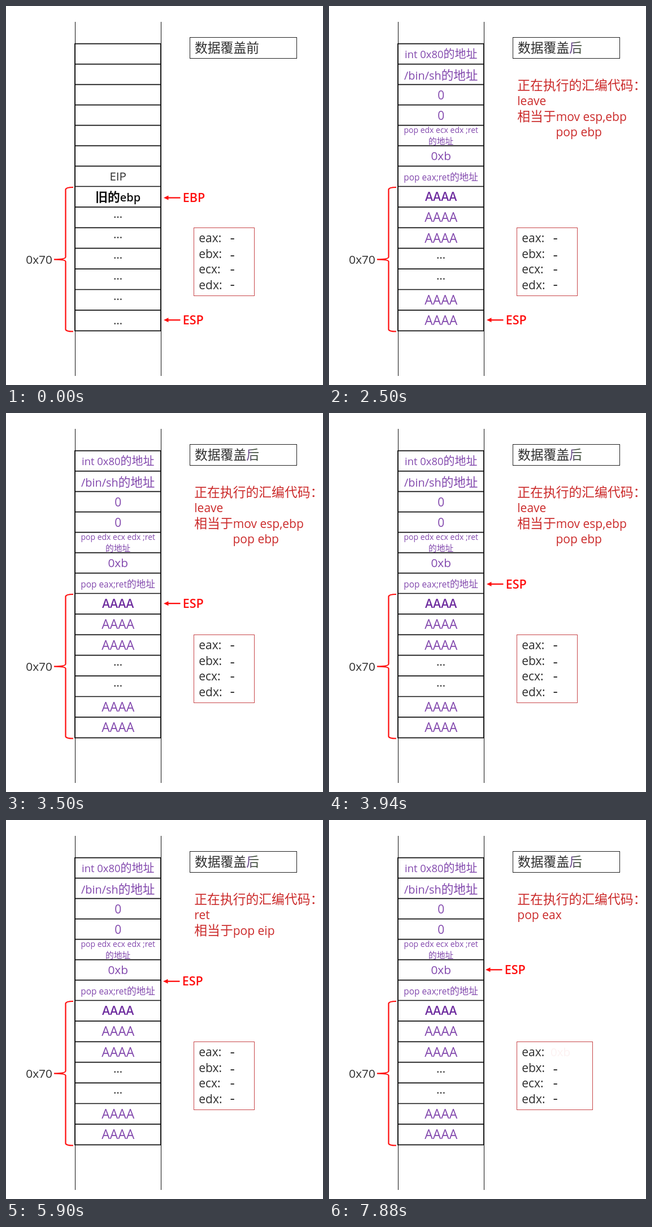
Recreate the animation shown at these times as an HTML page. Size 561 by 669 pixels, loop 8 s.

```html
<!DOCTYPE html>
<html lang="zh-CN">
<head>
<meta charset="utf-8">
<title>Stack overwrite</title>
<style>
  html, body { margin: 0; width: 100%; height: 100%; overflow: hidden; background: #fff; }
  svg { display: block; width: 561px; height: 669px; }
  text { font-family: "Open Sans", "Noto Sans CJK SC", "Noto Sans CJK", sans-serif; white-space: pre; }
</style>
</head>
<body>
<svg id="stage" viewBox="0 0 561 669" xmlns="http://www.w3.org/2000/svg">
  <defs>
    <linearGradient id="mixed">
      <stop offset=".2" stop-color="#6b4a8c"/>
      <stop offset=".5" stop-color="#3c4a38"/>
    </linearGradient>
  </defs>
</svg>
<script>
const LOOP = 8000;
const LINE = '#111', INK = '#2e2e2e', PURPLE = '#8248ad', DEEP_PURPLE = '#7030a0';
const RED = '#ff0d0d', CODE = '#cb2a2a', BOX = '#c8474a';
const MID = 198.2;
const CJK_SCALE = 1.086;
const stage = document.getElementById('stage');

function add(parent, tag, attrs = {}) {
  const node = document.createElementNS(stage.namespaceURI, tag);
  for (const key in attrs) node.setAttribute(key, attrs[key]);
  parent.appendChild(node);
  return node;
}

// Chinese runs are set slightly larger than the Latin runs beside them.
function label(parent, content, x, y, size = 21, attrs = {}) {
  const node = add(parent, 'text', { x, y, 'font-size': size, fill: INK, ...attrs });
  for (const run of content.match(/[\u4e00-\u9fff：]+|[^\u4e00-\u9fff：]+/g)) {
    const isCjk = /[\u4e00-\u9fff]/.test(run);
    add(node, 'tspan', isCjk ? { 'font-size': size * CJK_SCALE } : {}).textContent = run;
  }
  return node;
}

const group = () => add(stage, 'g');
const path = (parent, d, stroke, width) =>
  add(parent, 'path', { d, stroke, 'stroke-width': width, fill: 'none' });
const box = (parent, x, y, width, height, stroke) =>
  add(parent, 'rect', { x, y, width, height, stroke, fill: 'none' });
const cell = (parent, content, y, size, fill = PURPLE, weight = 400) =>
  label(parent, content, MID, y, size, { fill, 'font-weight': weight, 'text-anchor': 'middle' });
const dots = (parent, row) => cell(parent, '…', 373.5 + 36.4 * (row - 8), 20.6, INK);

function pointer(name) {
  const g = group();
  add(g, 'path', { d: 'M0 0L8.5-4V4Z', fill: RED });
  path(g, 'M7 0H29.5', RED, 2.3);
  label(g, name, 33.8, 7.6, 21.5, { fill: RED, 'font-weight': 600 });
  return g;
}

const place = (node, x, y) => node.setAttribute('transform', `translate(${x} ${y})`);

// Stack outline
const frame = group();
path(frame, 'M122.5 28V653M274.5 28V653', LINE, 1);
for (let i = 0; i <= 14; i++) {
  const y = i < 7 ? 66.7 + 36 * i : 318.5 + 36.4 * (i - 7);
  path(frame, `M121.5 ${y}H275`, LINE, 1.7);
}
path(frame, 'M122 66V574M274 66V574', LINE, 1.9);
path(frame, 'M119 320Q106 320 105.5 324V443Q105.5 447.3 85 447.3' +
  'Q105.5 447.3 105.5 451V571Q106 574.5 119 574.5', RED, 2.2);
label(frame, '0x70', 35.3, 455, 20.8);

// Title
box(frame, 325.5, 55.5, 189, 37, '#222');
label(frame, '数据覆盖', 334, 82.3);

// Stack contents
const before = group();
label(before, '前', 425.2, 82.3);
cell(before, 'EIP', 307.8, 20.6, INK);
cell(before, '旧的ebp', 344.8, 20, LINE, 600);
for (let row = 8; row < 13; row++) dots(before, row);
cell(before, '…', 562, 20.6, INK);

const after = group();
label(after, '后', 425.2, 82.3, 21, { fill: 'url(#mixed)' });
cell(after, 'int 0x80的地址', 92.3, 18.4);
cell(after, '/bin/sh的地址', 129.5, 19.9);
cell(after, '0', 165.3);
cell(after, '0', 201.3);
const popEdx = cell(after, 'pop edx ecx edx ;ret', 224.3, 14);
const popEbx = cell(after, 'pop edx ecx ebx ;ret', 224.3, 14);
cell(after, '的地址', 243.5, 13.6);
cell(after, '0xb', 271.8, 20.8);
cell(after, 'pop eax;ret的地址', 307.5, 15.4);
cell(after, 'AAAA', 344.3, 21.4, DEEP_PURPLE, 600);
for (const y of [381, 417.8, 527, 563]) cell(after, 'AAAA', y, 22.9);
dots(after, 10);
dots(after, 11);

// Registers
const narrowBox = box(stage, 332.5, 391.5, 107, 120, BOX);
const wideBox = box(stage, 332.5, 391.5, 134, 120, BOX);
const registers = group();
const dashes = ['eax:', 'ebx:', 'ecx:', 'edx:'].map((name, i) => {
  label(registers, name, 341.3, 417.3 + 27.5 * i);
  return label(registers, '-', 400.6, [418, 447.6, 473.3, 500.3][i], 26, { 'text-anchor': 'middle' });
});
const eaxValue = label(registers, '0xb', 392, 417.3, 20.6, { fill: '#fdf2f2' });

// Instruction notes, each shown for one stretch of time
function note(start, end, ...lines) {
  const g = group();
  ['正在执行的汇编代码：', ...lines].forEach((line, i) =>
    label(g, line.trimStart(), line.startsWith(' ') ? 401.5 : 333.3, 147.6 + 27.5 * i, 21, { fill: CODE }));
  return { g, start, end };
}
const notes = [
  note(2500, 4480, 'leave', '相当于mov esp,ebp', ' pop ebp'),
  note(4480, 7010, 'ret', '相当于pop eip'),
  note(7010, LOOP, 'pop eax'),
];

const ebp = pointer('EBP');
place(ebp, 279, 338.5);
const esp = pointer('ESP');

function stepped(t, start, interval, count, from, to) {
  const n = Math.max(0, Math.min(count, Math.floor((t - start) / interval)));
  return from + (to - from) * n / count;
}

function espHeight(t) {
  if (t < 3400) return stepped(t, 2510, 110, 7, 554.3, 343);
  if (t < 4480) return stepped(t, 3292, 108, 6, 343, 302);
  if (t < 6340) return stepped(t, 5470, 110, 7, 300.3, 264);
  return t < 7880 ? 263.7 : 264.3;
}

const show = (node, visible) => node.setAttribute('display', visible ? 'inline' : 'none');

function draw(t) {
  show(before, t < 500);
  show(after, t >= 500);
  show(ebp, t < 2500);
  show(popEdx, t < 7010);
  show(popEbx, t >= 7010);
  show(narrowBox, t < 7010);
  show(wideBox, t >= 7010);
  show(dashes[0], t < 7880);
  show(eaxValue, t >= 7880);
  for (const { g, start, end } of notes) show(g, t >= start && t < end);
  place(esp, t < 4480 ? 279 : t < 7880 ? 278 : 277, espHeight(t));
}

const startTime = performance.now();
function tick() {
  draw((performance.now() - startTime) % LOOP);
  requestAnimationFrame(tick);
}
draw(0);
requestAnimationFrame(tick);
</script>
</body>
</html>
```
